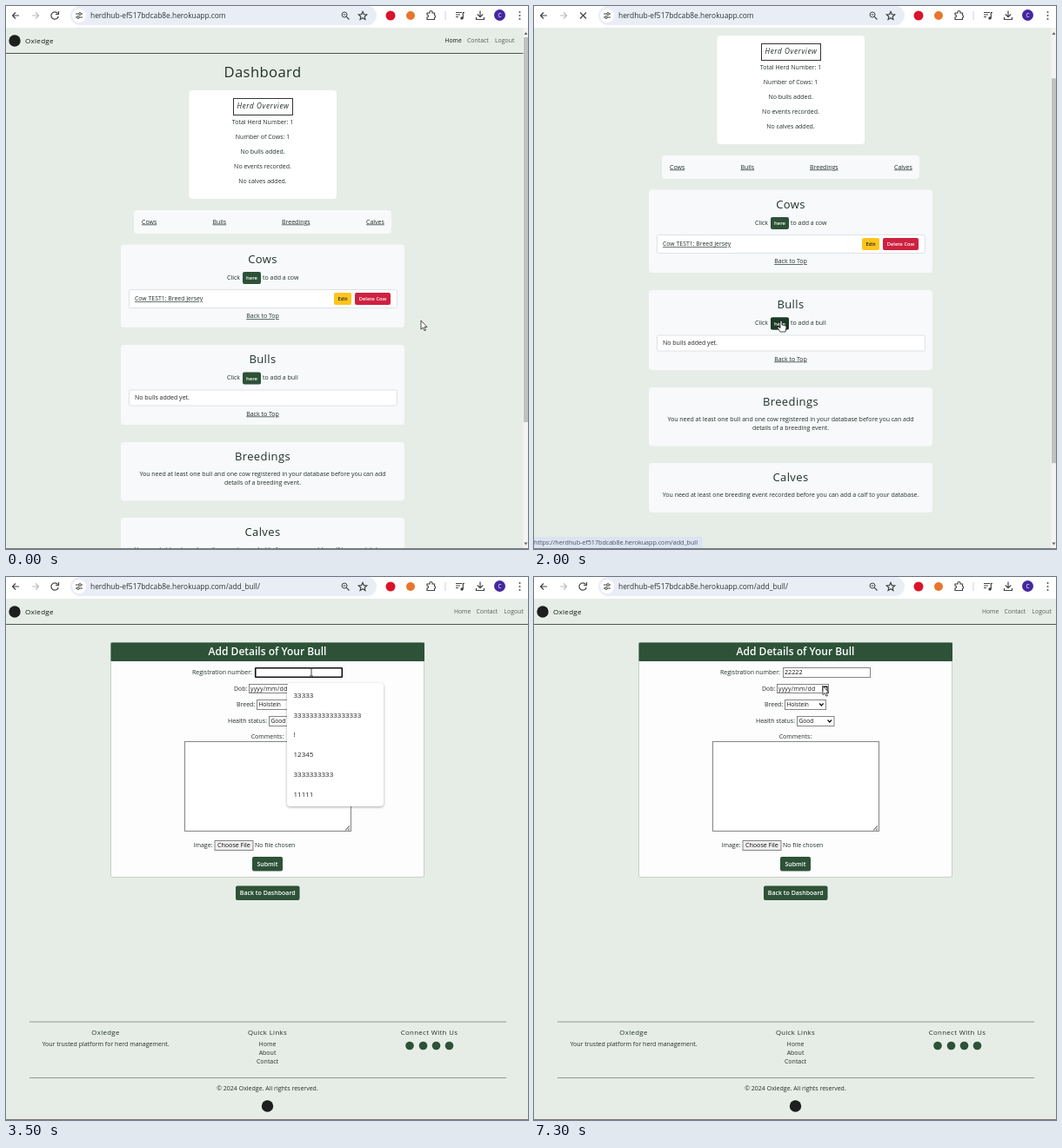
An HTML page for the animation above (8000 ms loop, 600x625 px).

```html
<!DOCTYPE html>
<html lang="en">
<head>
<meta charset="utf-8">
<title>Herd dashboard</title>
<style>
html, body { margin: 0; width: 100%; height: 100%; overflow: hidden; background: #e6ede6; }
svg { display: block; width: 600px; height: 625px; }
text { font-family: "Open Sans", "Noto Sans", sans-serif; white-space: pre; }
</style>
</head>
<body>
<svg id="stage" viewBox="0 0 600 625"></svg>
<script>
const GREEN = '#2d5237', INK = '#203128', MUTED = '#535f58', LINE = '#858585', CARD = '#f7f9fa';
const BRAND = 'Oxledge', HOST = 'herdhub-ef517bdcab8e.herokuapp.com';

const attrs = o => Object.entries(o).map(([k, v]) => `${k}="${v}"`).join(' ');
const rect = (x, y, w, h, fill, o = {}) =>
  `<rect x="${x}" y="${y}" width="${w}" height="${h}" fill="${fill}" ${attrs(o)}/>`;
const box = (x, y, w, h, line, fill = '#fff', o = {}) =>
  rect(x + .5, y + .5, w - 1, h - 1, fill, { stroke: line, ...o });
const dot = (x, y, r, fill) => `<circle cx="${x}" cy="${y}" r="${r}" fill="${fill}"/>`;
const path = (d, stroke = '#444', o = {}) =>
  `<path d="${d}" fill="none" stroke="${stroke}" stroke-width="1.2" ${attrs(o)}/>`;
const group = (id, body) => `<g id="${id}">${body}</g>`;

// Text placed by the middle of its capitals.
const text = (x, y, s, size = 7, o = {}) =>
  `<text x="${x}" y="${y + size * .36}" font-size="${size}" ${attrs({ fill: INK, ...o })}>${s}</text>`;
const mid = (x, y, s, size = 7, o = {}) => text(x, y, s, size, { 'text-anchor': 'middle', ...o });
const link = { 'text-decoration': 'underline' };
const spaced = { 'letter-spacing': .4 };
const title = (y, s, size = 13) => mid(295, y, s, size, spaced);
const button = (x, y, w, h, s, fill = GREEN, size = 7, color = '#fff') =>
  rect(x, y, w, h, fill, { rx: 2 }) +
  mid(x + w / 2, y + h / 2, s, size, { fill: color, 'font-weight': 600 });

function toolbar() {
  return rect(0, 0, 600, 25, '#fff') +
    path('M15 11H8M11 7.5L7.5 11L11 14.5') +
    path('M30 11H37M34 7.5L37.5 11L34 14.5', '#bbb') +
    group('reload', path('M59.5 8.5A4.2 4.2 0 1 0 60.2 12M60.5 6V9.5H57')) +
    group('stop', path('M53 7.5L60 14.5M60 7.5L53 14.5')) +
    rect(74, 0, 352, 22, '#e9eef6', { rx: 11 }) + dot(84, 11, 8, '#fff') +
    path('M80 9H83M87 9H88M80 13H81M85 13H88') +
    `<g fill="none" stroke="#444">
      <circle cx="85" cy="9" r="1.4"/><circle cx="83" cy="13" r="1.4"/>
      <circle cx="389" cy="10" r="3"/></g>` +
    path('M391.3 12.3L394.5 15.5M387.5 10H390.5') +
    path('M410 6.5L411.4 9.6L414.7 10L412.2 12.2L412.9 15.5L410 13.8L407.1 15.5L407.8 12.2L405.3 10L408.6 9.6Z') +
    `<text id="url" x="97" y="14" font-size="8.4" fill="#30343a"></text>` +
    dot(442, 11, 5.5, '#d9152c') + dot(465, 11, 5, '#e8762c') +
    path('M484 8H487V7A1.5 1.5 0 0 1 490 7V8H492.5V10.5A1.6 1.6 0 0 1 492.5 13.5V15.5H484V13A1.5 1.5 0 0 0 484 10Z') +
    rect(504.5, 6, 1, 10, '#c9d5ea') +
    path('M517 7.5H524M517 10H522M517 12.5H520M525.3 14V7.5H527') + dot(524, 14, 1.7, '#444') +
    path('M545 5.5V12.5M541.8 9.5L545 12.7L548.2 9.5M540.5 13V15.5H549.5V13') +
    dot(567.5, 10.5, 6.5, '#4527a0') + mid(567.5, 10.5, 'C', 6.5, { fill: '#fff' }) +
    [7, 11, 15].map(y => dot(590.5, y, 1, '#555')).join('');
}

function navbar(dx, right, home) {
  return dot(10, 40, 6.7, '#1c1f1d') +
    text(22, 40, BRAND, 8, { 'letter-spacing': .3, fill: '#0c1510' }) +
    text(504.5 + dx, 40, 'Home', 6.8, { fill: home }) +
    text(530 + dx, 40, 'Contact', 6.9, { fill: MUTED }) +
    text(562 + dx, 40, 'Logout', 6.9, { fill: MUTED }) +
    rect(0, 54, right, 1, '#4b564f');
}

function herdCard(y, h, name, item, itemH) {
  const one = name.slice(0, -1).toLowerCase(), end = y + 51.5 + itemH;
  return rect(132, y, 326, h, CARD, { rx: 4 }) + title(y + 16.5, name) +
    text(254, y + 37.5, 'Click') + button(272, y + 31.5, 21, 14, 'here', GREEN, 6) +
    text(295, y + 37.5, 'to add a ' + one) +
    box(141, y + 51.5, 309, itemH, '#dee2e6', '#fff', { rx: 2 }) + item +
    mid(295, end + 8.5, 'Back to Top', 7, link);
}

function noteCard(y, h, name, lines) {
  return rect(132, y, 326, h, CARD, { rx: 4 }) + title(y + 16, name) +
    lines.map((s, i) => mid(295, y + 36 + i * 10, s)).join('');
}

function dashboard() {
  const facts = ['Total Herd Number: 1', 'Number of Cows: 1', 'No bulls added.',
    'No events recorded.', 'No calves added.'];
  const tabs = { Cows: 156, Bulls: 237.5, Breedings: 317, Calves: 414 };
  const cow = text(148, 336.5, 'Cow TEST1: Breed Jersey', 6.9, link) +
    button(377, 330, 20, 14, 'Edit', '#ffc41c', 6, '#222') +
    button(401, 330, 41, 14, 'Delete Cow', '#cf2140', 5.8);
  return group('scroller',
      navbar(0, 595, '#0c1510') + title(76.5, 'Dashboard', 16.6) +
      rect(210.5, 97, 169.5, 125, '#fff', { rx: 4 }) + box(261, 106, 69, 20, '#333') +
      mid(295.5, 115.5, 'Herd Overview', 8.2, { 'font-style': 'italic', 'letter-spacing': .6 }) +
      facts.map((s, i) => mid(295, 133.5 + i * 17, s)).join('') +
      rect(147, 235, 296, 27, CARD, { rx: 4 }) +
      Object.entries(tabs).map(([s, x]) => text(x, 248, s, 7, link)).join('') +
      herdCard(274.5, 95.5, 'Cows', cow, 22) +
      herdCard(390, 92, 'Bulls', text(148, 450, 'No bulls added yet.', 7, { fill: '#222' }), 19) +
      group('hover', rect(272, 421.5, 21, 14, '#1d3a26', { rx: 2 }) +
        mid(282.5, 428.5, 'here', 6, { fill: '#fff', 'font-weight': 600 })) +
      noteCard(502, 67.5, 'Breedings', [
        'You need at least one bull and one cow registered in your database before you can add',
        'details of a breeding event.']) +
      noteCard(589, 57, 'Calves', [
        'You need at least one breeding event recorded before you can add a calf to your database.'])) +
    rect(594.5, 25, 5.5, 600, '#f2f3f2') +
    '<path d="M595.5 33L597.5 30L599.5 33ZM595.5 617.5L597.5 620.5L599.5 617.5Z" fill="#666"/>' +
    '<rect id="thumb" x="595" width="5" height="443" fill="#bfc2c0"/>';
}

const select = (x, y, w, s) => box(x, y, w, 12, LINE) + text(x + 2.5, y + 5.5, s, 6.6, { fill: '#111' }) +
  path(`M${x + w - 8} ${y + 4.5}l2.3 2.5l2.3 -2.5`, '#111');

function form() {
  const heading = (x, s) => mid(x, 524, s, 7.8, { 'letter-spacing': .35 });
  return navbar(10.5, 600, MUTED) +
    box(120, 75, 361, 271, '#c6cec8', '#fdfdfe', { rx: 2.5 }) +
    rect(120.5, 75.5, 360.5, 21.5, GREEN, { rx: 1 }) +
    mid(300.5, 85.5, 'Add Details of Your Bull', 12, { fill: '#fff', 'font-weight': 600 }) +
    text(214, 109, 'Registration number:') + box(286, 104, 101, 12, LINE) +
    group('focus', rect(286.7, 104.7, 99.6, 10.6, '#fff', { stroke: '#111', 'stroke-width': 1.6, rx: 1 })) +
    `<text id="value" x="288" y="112" font-size="7.2" fill="#111"></text>` +
    '<rect id="caret" y="105.8" width=".8" height="8.5" fill="#111"/>' +
    text(262, 128, 'Dob:') + box(279, 123, 60, 11, LINE) +
    text(281, 128, 'yyyy/mm/dd', 7, { 'letter-spacing': .15, fill: '#222' }) +
    path('M332 126H337V131H332ZM332 126.5H337', '#111') +
    text(265, 146.5, 'Breed:') + select(288, 141, 48, 'Holstein') +
    text(255, 165.5, 'Health status:') + select(302, 160, 43.5, 'Good') +
    mid(300.5, 183.5, 'Comments:') + box(205, 189, 192, 104, LINE) +
    path('M390 291.5L395 286.5M393 291.5L395 289.5', LINE, { 'stroke-width': .8 }) +
    text(215.5, 308.5, 'Image:') + box(239.5, 303, 45, 12, LINE, '#efefef') +
    text(243, 308.5, 'Choose File', 7.1, { fill: '#111' }) + text(286, 308.5, 'No file chosen', 7) +
    button(283, 322, 35, 16.5, 'Submit') + button(264, 355.5, 73.5, 16.5, 'Back to Dashboard') +
    rect(27, 511.5, 548, 1, '#8f9992') + rect(27, 576, 548, 1, '#8f9992') +
    heading(114.5, BRAND) + heading(300.5, 'Quick Links') + heading(486.5, 'Connect With Us') +
    mid(114.5, 537, 'Your trusted platform for herd management.') +
    ['Home', 'About', 'Contact'].map((s, i) => mid(300.5, 537 + i * 10, s)).join('') +
    [464, 479.5, 494.5, 509.5].map(x => dot(x, 539.5, 4.8, GREEN)).join('') +
    mid(300.5, 588.5, `© 2024 ${BRAND}. All rights reserved.`) + dot(300.5, 609, 6.7, '#1c1f1d');
}

function popup(id, w, h, items) {
  return group(id, `<g style="filter:drop-shadow(0 1px 1.5px #0005)">${rect(323, 122, w, h, '#fff', { rx: 4 })}</g>` +
    items.map((s, i) => text(330.5, 136 + i * 22.8, s, 8, { fill: '#222' })).join(''));
}

const outline = { stroke: '#222', 'stroke-width': .8, 'stroke-linejoin': 'round' };
const pointer = (id, d) => `<path id="${id}" d="${d}" fill="#fff" ${attrs(outline)}/>`;
const stage = document.getElementById('stage');
stage.innerHTML =
  rect(0, 0, 600, 625, '#e6ede6') + group('dashboard', dashboard()) + group('form', form()) +
  popup('suggestions', 111, 142, ['33333', '3'.repeat(17), '!', '12345', '3'.repeat(10), '11111']) +
  popup('match', 99, 28, ['22222']) + toolbar() +
  group('status', rect(-3, 611, 197, 15, '#dbe4f2', { rx: 3 }) +
    text(0, 617.5, `https://${HOST}/add_bull`, 7.15, { fill: '#4a4f58' })) +
  rect(0, 624, 600, 1, '#777') +
  group('cursor',
    pointer('arrow', 'M0 0V10.2L2.3 8.1L3.9 11.7L5.5 11L3.9 7.5H7Z') +
    pointer('hand', 'M-1 1Q0 -1 1 1V5L5 6Q6 6.3 6 8L5 13H-1L-4 8.5Q-4 7 -2.5 7.5L-1 8.8Z') +
    '<path id="beam" d="M-2 -4.5H2M0 -4.5V4.5M-2 4.5H2" stroke="#444" fill="none"/>');

const $ = id => document.getElementById(id);
const show = (id, on) => { $(id).style.display = on ? '' : 'none'; };

// Keys are [time, ...values]; values between keys are linear.
function track(keys, t) {
  const i = keys.findIndex(k => k[0] > t);
  if (i < 0) return keys[keys.length - 1].slice(1);
  const a = keys[i - 1], b = keys[i], p = (t - a[0]) / (b[0] - a[0]);
  return a.slice(1).map((v, j) => v + (b[j + 1] - v) * p);
}

const scrollKeys = [[0, 0], [100, 5], [400, 40.5], [700, 58], [900, 62.5], [1000, 63]];
const cursorKeys = [[0, 477, 362], [100, 474, 361], [400, 450, 355], [900, 350, 358], [1300, 284, 362],
  [2300, 284, 362], [2600, 295, 344], [3200, 340, 125], [3400, 351, 109.5], [3700, 351, 109.5],
  [3900, 380, 92], [4100, 400, 107], [4900, 400, 107], [5300, 489, 143], [6100, 489, 143],
  [6600, 410, 176], [7000, 340, 130], [7300, 332, 125.5]];

function draw(now) {
  const t = Math.floor(now % 8000 / 100) * 100;
  const between = (a, b) => t >= a && t < b;
  const [scroll] = track(scrollKeys, t), [x, y] = track(cursorKeys, t);
  const onForm = t >= 2100, loading = between(1600, 2400), focused = between(3400, 6700);
  const typed = [5900, 5900, 5900, 6000, 6200].filter(k => t >= k).length;
  const hand = between(1500, 2400), beam = between(3300, 3900);

  show('dashboard', !onForm);
  show('form', onForm);
  $('scroller').setAttribute('transform', `translate(0 ${-scroll})`);
  $('thumb').setAttribute('y', 36 + scroll * .75);
  show('hover', hand);
  show('status', hand);
  show('reload', !loading);
  show('stop', loading);
  $('url').textContent = HOST + (onForm ? '/add_bull/' : '');

  show('focus', focused);
  show('caret', focused && (between(5900, 6400) || t % 1000 < 500));
  $('caret').setAttribute('x', 288 + typed * 4.12);
  $('value').textContent = '2'.repeat(typed);
  show('suggestions', between(3500, 5900));
  show('match', between(5900, 6600));

  show('hand', hand);
  show('beam', beam);
  show('arrow', !hand && !beam);
  $('cursor').setAttribute('transform', `translate(${x} ${y})`);
}

const start = performance.now();
function tick() {
  draw(performance.now() - start);
  requestAnimationFrame(tick);
}
draw(0);
requestAnimationFrame(tick);
</script>
</body>
</html>
```
